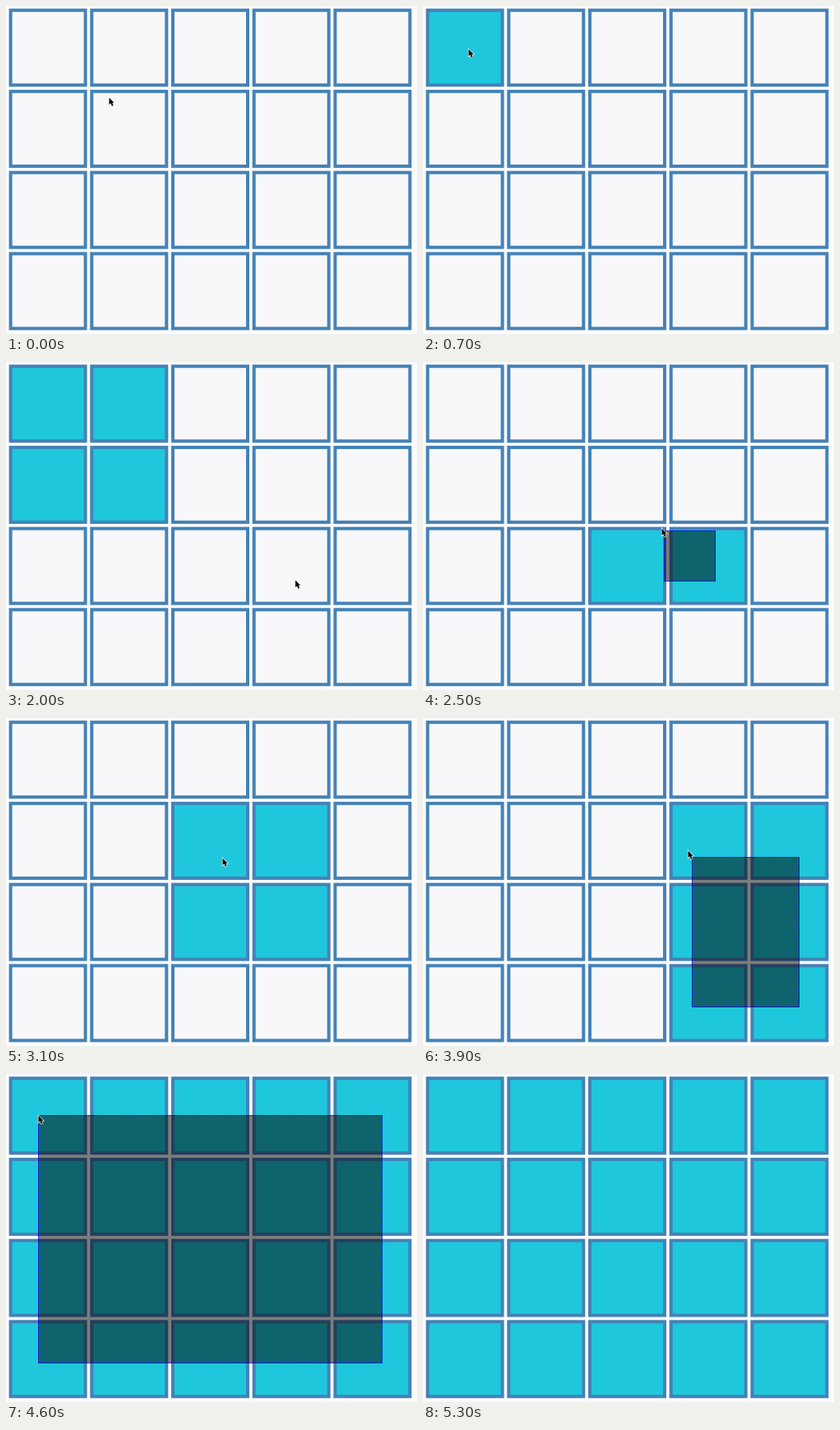
An HTML page with a canvas for the animation above (6 s loop, 500x399 px).

```html
<!DOCTYPE html>
<html lang="en">
<head>
<meta charset="utf-8">
<title>Drag to select</title>
<style>
  html, body { margin: 0; width: 500px; height: 399px; overflow: hidden; background: #fbfbfd; }
  canvas { display: block; }
</style>
</head>
<body>
<canvas id="stage" width="500" height="399"></canvas>
<script>
const ctx = document.getElementById('stage').getContext('2d');
const LOOP = 6000, STEP = 100, LAG = 60, POINTER_END = 5200;
const COLS = 5, ROWS = 4, PITCH = 98.7, SIZE = 95, BORDER = 4;

// The pointer eases out towards each stop in turn
const home = { x: 125, y: 111 };
const moves = [
  { start: 0, end: 600, x: 55, y: 52 },
  { start: 700, end: 1200, x: 197, y: 198 },
  { start: 1500, end: 2100, x: 356, y: 267 },
  { start: 2200, end: 2500, x: 290, y: 202 },
  { start: 2500, end: 2800, x: 263, y: 170 },
  { start: 3100, end: 3600, x: 458, y: 352 },
  { start: 3600, end: 3900, x: 322, y: 161 },
  { start: 3900, end: 4500, x: 39, y: 50 }
];
const drags = [
  { press: 700, release: 1500 },
  { press: 2200, release: 3000 },
  { press: 3600, release: 4800 }
];

const mix = (a, b, k) => a + (b - a) * k;
const easeOut = u => 1 - (1 - u) ** 2;

function pointerAt(t) {
  return moves.filter(m => m.start < t).reduce((p, m) => {
    const k = easeOut(Math.min(1, (t - m.start) / (m.end - m.start)));
    return { x: mix(p.x, m.x, k), y: mix(p.y, m.y, k) };
  }, home);
}

// The rubber band trails the pointer slightly
function bandAt({ press, release }, t) {
  const a = pointerAt(press);
  const b = pointerAt(Math.max(press, Math.min(t, release) - LAG));
  return {
    left: Math.round(Math.min(a.x, b.x)), right: Math.round(Math.max(a.x, b.x)),
    top: Math.round(Math.min(a.y, b.y)), bottom: Math.round(Math.max(a.y, b.y))
  };
}

function drawCell(x, y, band) {
  const selected = band && band.left < x + SIZE && band.right > x &&
    band.top < y + SIZE && band.bottom > y;
  ctx.fillStyle = '#4482b6';
  ctx.fillRect(x, y, SIZE, SIZE);
  ctx.fillStyle = selected ? '#1fc7dc' : '#f8f8fa';
  ctx.fillRect(x + BORDER, y + BORDER, SIZE - 2 * BORDER, SIZE - 2 * BORDER);
}

function drawBand({ left, top, right, bottom }) {
  const w = right - left, h = bottom - top;
  if (!w || !h) return;
  ctx.fillStyle = 'rgba(0, 0, 0, .5)';
  ctx.fillRect(left, top, w, h);
  ctx.strokeStyle = '#00f';
  ctx.lineWidth = 1;
  ctx.setLineDash([2, 1]);
  ctx.strokeRect(left + .5, top + .5, w - 1, h - 1);
  ctx.setLineDash([]);
}

const arrow = new Path2D('M0 0V10L2.3 8L4 12L6 11.2L4.3 7.3H7.2Z');

function drawPointer({ x, y }) {
  ctx.save();
  ctx.translate(x + .5, y + .5);
  ctx.scale(.85, .85);
  ctx.strokeStyle = '#fff';
  ctx.lineWidth = 1.5;
  ctx.stroke(arrow);
  ctx.fillStyle = '#000';
  ctx.fill(arrow);
  ctx.restore();
}

function frame(now) {
  const t = Math.floor(now % LOOP / STEP) * STEP;
  const drag = drags.filter(d => d.press <= t).pop();
  const band = drag && bandAt(drag, t);
  ctx.clearRect(0, 0, 500, 399);
  for (let row = 0; row < ROWS; row++)
    for (let col = 0; col < COLS; col++)
      drawCell(3.6 + col * PITCH, 3.2 + row * PITCH, band);
  if (drag && t < drag.release) drawBand(band);
  if (t < POINTER_END) drawPointer(pointerAt(t));
  requestAnimationFrame(frame);
}
requestAnimationFrame(frame);
</script>
</body>
</html>
```
